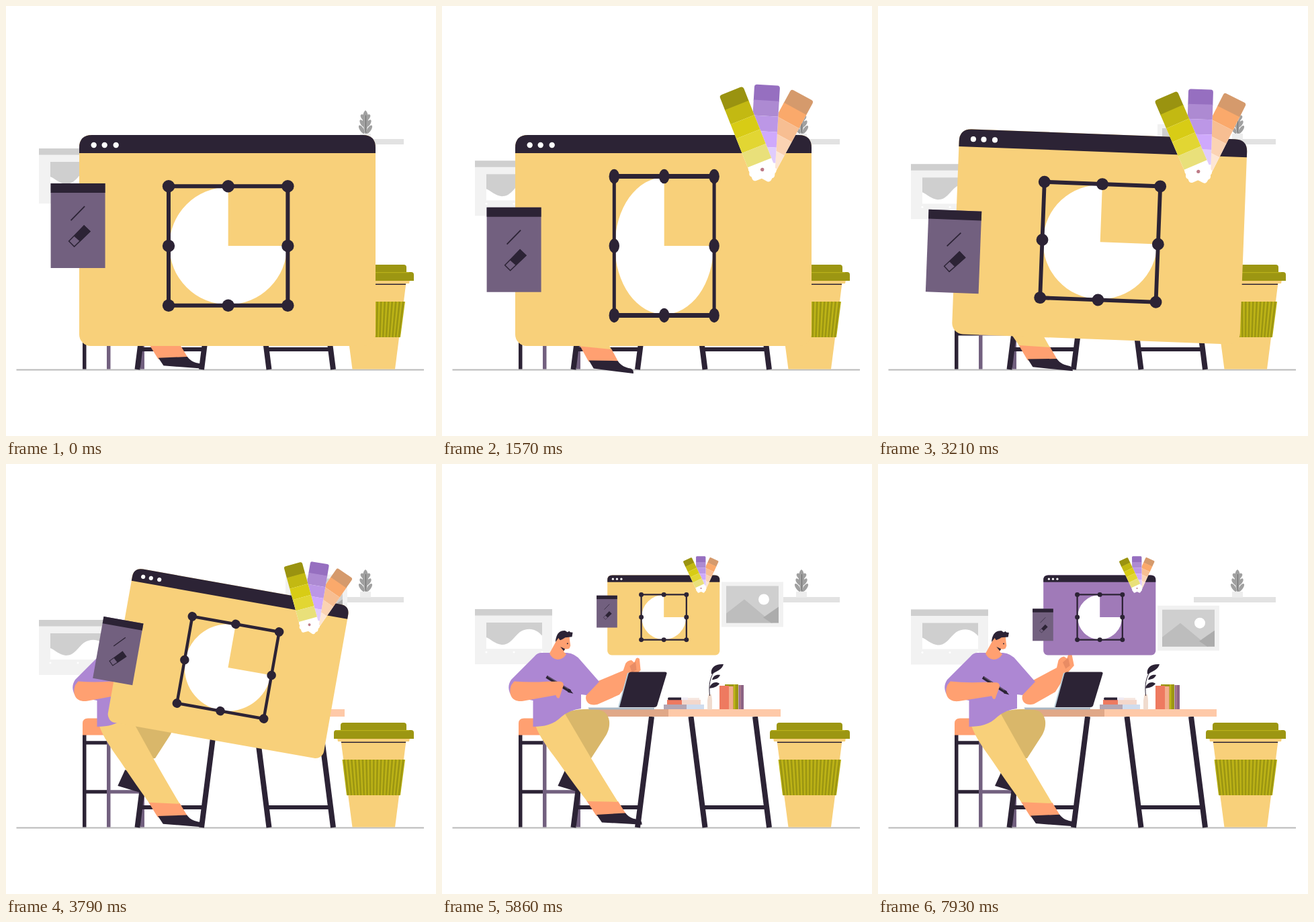
Write an HTML page that moves like this. It is 640 by 640 pixels and loops after 8000 ms.

```html
<!DOCTYPE html>
<html lang="en">
<head>
<meta charset="utf-8">
<title>Designer at work</title>
<style>
html, body { margin: 0; width: 100%; height: 100%; overflow: hidden; background: #fff; }
svg { display: block; width: 100vw; height: 100vh; }
.dark { fill: #2c2335; }
.skin { fill: #ffa071; }
.shirt { fill: #ad87d3; }
.pants { fill: #f8d07a; }
.olive { fill: #9c9612; }
.violet { fill: #72607f; }
.line { fill: none; stroke: #2c2335; }
</style>
</head>
<body>
<svg viewBox="0 0 640 640">
  <path d="M15.5 541.5H622" stroke="#b9b9b9" stroke-width="2"/>

  <g id="chart">
    <path fill="#f2f2f2" d="M49 0h115v82H49z"/>
    <path fill="#cfcfcf" d="M49 0h115v9.5H49z"/>
    <path fill="#fff" d="M66 20h83v39H66z"/>
    <path fill="#cfcfcf" d="M66 20H149V39.5C141 30 129 26 116 34C106 42 102 53 89 53C79 52 73 45 66 42Z"/>
    <g fill="#fff"><circle cx="66" cy="64" r="1.5"/><circle cx="107" cy="64" r="1.5"/><circle cx="149" cy="64" r="1.5"/></g>
  </g>

  <path fill="#e2e2e2" d="M470 198h122v8H470z"/>
  <g id="plant" fill="#a0a0a0">
    <path d="M535 190C530 178 529 161 535 157C541 161 540 178 535 190Z"/>
    <g id="leaves"></g>
    <path d="M535.5 164V191" stroke="#6f6f6f" fill="none"/>
  </g>
  <path fill="#ededed" d="M527 190h16v8.5h-16z"/>

  <g id="photo">
    <path fill="#f1f1f1" d="M416 0h92v67h-92z"/>
    <path fill="#cfcfcf" d="M423 6h78v55h-78z"/>
    <path fill="#bdbdbd" d="M423 47L450 26L492 61H423Z"/>
    <path fill="#acacac" d="M478 53L501 37V61H490Z"/>
    <circle cx="479" cy="26" r="8" fill="#fff"/>
  </g>

  <g id="cup">
    <path class="pants" d="M498.5 412H595.5L579 540.5H515.5Z"/>
    <path class="pants" d="M493 408h108l-1 5H494z"/>
    <path class="line" stroke-width="1.5" d="M499 414.2H595"/>
    <rect class="olive" x="498" y="385" width="98" height="16" rx="4"/>
    <path class="olive" d="M488 409V400Q488 396 492 396H603Q607 396 607 400V409Z"/>
    <path d="M491 396.7H600" stroke="#b9b11a" stroke-width="1.3"/>
    <path fill="#beb417" d="M500.5 440H594L587 493H507Z"/>
    <path id="ribs" stroke="#9c9612" stroke-width="2.7"/>
  </g>

  <g class="violet">
    <path d="M150 403h5.5V540.5H150z"/>
    <path d="M200 487h6V540.5h-6z"/>
    <path d="M155 485.3h50v5.2h-50z"/>
  </g>
  <path class="dark" d="M114 403h5.5V540.5H114zM119 412.3h31v5.2h-31zM119 485.3h31v5.2h-31z"/>
  <path class="skin" d="M114 403.5V386Q114 378.5 122 378.5H200V403.5Z"/>

  <g class="line" stroke-width="8">
    <path d="M216.5 376L195.5 541M312 376L291 541M370.5 376L391.5 541M466 376L487 541"/>
    <path stroke-width="6" d="M198 511H294M389 511H484"/>
  </g>
  <path fill="#fec9a8" d="M217 365h287v11H217z"/>
  <path fill="#e0a888" d="M217 365h120v11H217z"/>

  <g id="books">
    <path fill="#b3a6b3" d="M330 358h35v7h-35z"/>
    <path fill="#cfdcee" d="M364 358h26v7h-26z"/>
    <path fill="#ee7a60" d="M335 351h22v7h-22z"/>
    <path fill="#f3d7cb" d="M357 351h28v7h-28z"/>
    <path class="dark" d="M337 347.5h19v3.7h-19q-2-1.8 0-3.7z"/>
    <path fill="#efeaf3" d="M356 347.5h10v3.7h-10z"/>
    <path fill="#f6e8e1" d="M366 348h17v3.2h-17z"/>
    <path class="olive" d="M421 328h20v37h-20z"/>
    <path fill="#bdb418" d="M434 328h2.5v37H434z"/>
    <path fill="#ee7a60" d="M413 330h14v35h-14z"/>
    <path fill="#f3ad8e" d="M427 331h6.5v34H427z"/>
    <path fill="#8c6384" d="M441.5 329h7.5v36h-7.5z"/>
    <path fill="#c58b98" d="M443.5 329h1v36h-1z"/>
  </g>
  <g id="vase">
    <path fill="#f0dbce" d="M396.5 343h4.5l1 9v13.5h-7V352z"/>
    <path class="line" d="M398.5 345C397 329 398 317 408 305"/>
    <path class="dark" d="M401 313C399 303 407 297 419 298C417 306 408 309 401 313ZM402 321C404 315 408 313 414 314C412 319 407 321 402 321ZM398 334C400 325 408 323 413 327C409 332 404 333 398 334Z"/>
  </g>

  <path id="backShoe" class="dark" d="M180 455L169 479L204 489.5L212 470Z"/>
  <path fill="#d9b76a" d="M176 374C188 364 228 362 240 368C252 376 251 392 244 404L222 438L200 440Z"/>

  <g id="frontLeg">
    <path class="skin" d="M215 501L262 502L274 521L230 524Z"/>
    <path class="dark" d="M230 522L273 519.5C279 527 285 528 293 529.5Q298 531 297.5 536.7L238 533.5Z"/>
    <path class="pants" d="M139 389C146 408 158 423 172 442Q198 479 216 502L262 503Q240 468 222 438L182 370Z"/>
  </g>

  <g id="rightArm">
    <path class="skin" d="M232 324L271 309.5L275 299Q278 295 284 294.5L288 298L291 292Q294 290 296 293L297 310L284 321L264 345L231 358C218 361 211 352 215 343Z"/>
    <path fill="#e98c64" d="M281 303L290 297L291 309L284 313Z"/>
  </g>
  <path class="shirt" d="M148 281H186Q198 282 206 292L234 324L215 344L207 343V364Q190 366 178 376C166 388 152 391 135.5 391V352L104 346Q95 333 103 321L138 286Q142 281 148 281Z"/>
  <g id="head">
    <path class="skin" d="M160 282L171 261L176 254H189L190 264L191 270L189.5 274Q186 276 183 275L181 279L185 283Q180 291 172 291Q163 290 160 282Z"/>
    <path class="dark" d="M168.5 265C169 254 174 247 183 248L186 250L189 248.5L190 250L194 250.5L193 257L183 258Q177 262 175 262L173 259ZM176 272L183 275L181 278Z"/>
    <circle class="dark" cx="186.5" cy="267" r="1"/>
  </g>
  <g id="leftArm">
    <path class="line" stroke-width="4.5" d="M155 315.5L191 336.5"/>
    <path class="dark" d="M190 333.5L195.5 339.5L187 337.5Z"/>
    <path stroke="#72607f" d="M157 315L188 333"/>
    <path class="skin" d="M107 323.5Q130 325 157 322.5L176 322Q181 323 180.5 328L175 346Q172 349 169.5 342.5L121 352.5C104 355 98 342 103 329Z"/>
  </g>

  <g id="laptop">
    <path fill="#b9cdd8" d="M276 311L262 362H268L282 310Z"/>
    <path class="dark" d="M281 309.5H332Q335 309.5 334.5 312L320 360Q319 362 316 362H264L277.5 312Q278.5 309.5 281 309.5Z"/>
    <path fill="#a9b7c4" d="M217.5 362.5H316V365.5H219Z"/>
  </g>

  <g id="board">
    <rect id="pane" x="-221.7" y="-165" width="441" height="314" rx="17"/>
    <path class="dark" d="M-221.7 -138V-146Q-221.7 -165 -202.7 -165H200.3Q219.3 -165 219.3 -146V-138Z"/>
    <g fill="#fff"><circle cx="-200" cy="-150" r="4.2"/><circle cx="-184" cy="-150" r="4.2"/><circle cx="-167" cy="-150" r="4.2"/></g>
    <g id="pie">
      <path fill="#fff" d="M0 0V-87.5A87.5 87.5 0 1 0 87.5 0Z"/>
      <path class="line" stroke-width="6" d="M-88.7 -88.7H88.7V88.7H-88.7Z"/>
      <g id="handles" class="dark"></g>
    </g>
    <g id="card">
      <path class="violet" d="M-40.5 -63h81V63h-81z"/>
      <path class="dark" d="M-40.5 -63h81v14h-81z"/>
      <path class="line" stroke-width="1.8" d="M-10.5 -8L10 -29"/>
      <path class="line" stroke-width="1.5" d="M-13.5 23L9 0L18 8.5L-5.5 31Z"/>
      <path class="dark" d="M-6 15.5L9 -1L18.5 8.5L3 23.5Z"/>
    </g>
    <g id="fan"></g>
  </g>
</svg>
<script>
const LOOP = 8000;
const $ = id => document.getElementById(id);
const move = (id, value) => $(id).setAttribute('transform', value);
const clamp = x => Math.min(1, Math.max(0, x));
const part = (t, a, b) => clamp((t - a) / (b - a));
const ease = (t, a, b) => (1 - Math.cos(Math.PI * part(t, a, b))) / 2;
// Rises from a to b, falls back from b to c.
const hump = (t, a, b, c) => ease(t, a, b) - ease(t, b, c);
const arch = (t, a, b) => Math.sin(Math.PI * part(t, a, b));
const mix = (a, b, u) => `rgb(${a.map((v, i) => Math.round(v + (b[i] - v) * u))})`;

function swatch(angle, colors) {
  const bands = colors.map((c, i) => i
    ? `<path fill="${c}" d="M-19 ${-126 + i * 23}h38v23h-38z"/>`
    : `<path fill="${c}" d="M-19 -102V-122Q-19 -126 -15 -126H15Q19 -126 19 -122V-102Z"/>`);
  return `<g transform="rotate(${angle})">
    <rect fill="#fff" x="-19" y="-125.5" width="38" height="137.5" rx="4.5"/>${bands.join('')}</g>`;
}

function build() {
  let ribs = '';
  for (let u = 0.03; u < 1; u += 1 / 17) {
    ribs += `M${500.5 + 93.5 * u} 440L${507 + 80 * u} 493`;
  }
  $('ribs').setAttribute('d', ribs);

  let leaves = '';
  for (let i = 0; i < 3; i++) {
    for (const side of [-1, 1]) {
      leaves += `<ellipse rx="${5 + i}" ry="2.8" transform="translate(${535 + side * (3.5 + i)} ${167 + i * 8.5}) rotate(${-side * 55})"/>`;
    }
  }
  $('leaves').innerHTML = leaves;

  let handles = '';
  for (let i = 0; i < 9; i++) {
    if (i !== 4) handles += `<circle cx="${88.7 * (i % 3 - 1)}" cy="${88.7 * (Math.floor(i / 3) - 1)}" r="9.2"/>`;
  }
  $('handles').innerHTML = handles;

  $('fan').innerHTML =
    swatch(25, ['#d59a6c', '#faa96b', '#f7be92', '#fbd3b3', '#fde6d4']) +
    swatch(0, ['#966fc0', '#ad8ad2', '#bc97e6', '#cfa9fc', '#e0ccfd']) +
    swatch(-25, ['#9a9310', '#c3b912', '#d8cc15', '#e2d633', '#e9e07a']) +
    '<circle r="2.7" fill="#bd7a86"/>';
}

function drawRoom(t) {
  move('chart', `translate(0 ${212 + 25 * (hump(t, 0, 2400, 7100) + ease(t, 7200, 9800))})`);
  move('photo', `translate(0 ${216 - 55 * hump(t, 1200, 4300, 8850)})`);
  move('plant', `translate(0 190) scale(1 ${1.05 - 0.05 * ease(t, 0, 1600)}) translate(0 -190)`);
}

function drawPerson(t) {
  move('frontLeg', `rotate(${4.3 * (hump(t, -1000, 1800, 5100) + ease(t, 7000, 9800))} 150 370)`);
  move('backShoe', `translate(${8.5 * ease(t, 3000, 7000) - 3.5})`);
  move('rightArm', `rotate(${-8 * ease(t, 4500, 8300)} 222 343)`);
  move('leftArm', `rotate(${1.7 - 1.7 * Math.cos(2 * Math.PI * (t / 4800 - 1))} 108 338)`);
  move('head', `rotate(${1.5 * ease(t, 4300, 7000)} 172 285)`);
}

function drawBoard(t) {
  const shrink = ease(t, 2960, 4815);
  const tilt = 10.3 * arch(t, 2960, 4815) ** 1.75;
  move('board', `translate(${330.7 - 0.5 * shrink} ${357 - 129 * shrink}) rotate(${tilt}) scale(${1 - 0.621 * shrink})`);
  $('pane').setAttribute('fill', mix([248, 208, 122], [160, 122, 184], part(t, 7000, 7700)));

  const squash = arch(t, 0, 3000) ** 2;
  move('pie', `scale(${1 - 0.162 * squash} ${1 + 0.167 * squash})`);
  move('card', `translate(-223.6 ${-32 + 58 * hump(t, -400, 2900, 5100) + 62 * ease(t, 5100, 8000)})`);
  move('fan', `translate(146 -113.5) rotate(${3.4 - 3.8 * ease(t, 1500, 3100)}) scale(${ease(t, 300, 1000)})`);
}

function tick() {
  const t = performance.now() % LOOP;
  drawRoom(t);
  drawPerson(t);
  drawBoard(t);
  requestAnimationFrame(tick);
}

build();
tick();
</script>
</body>
</html>
```
